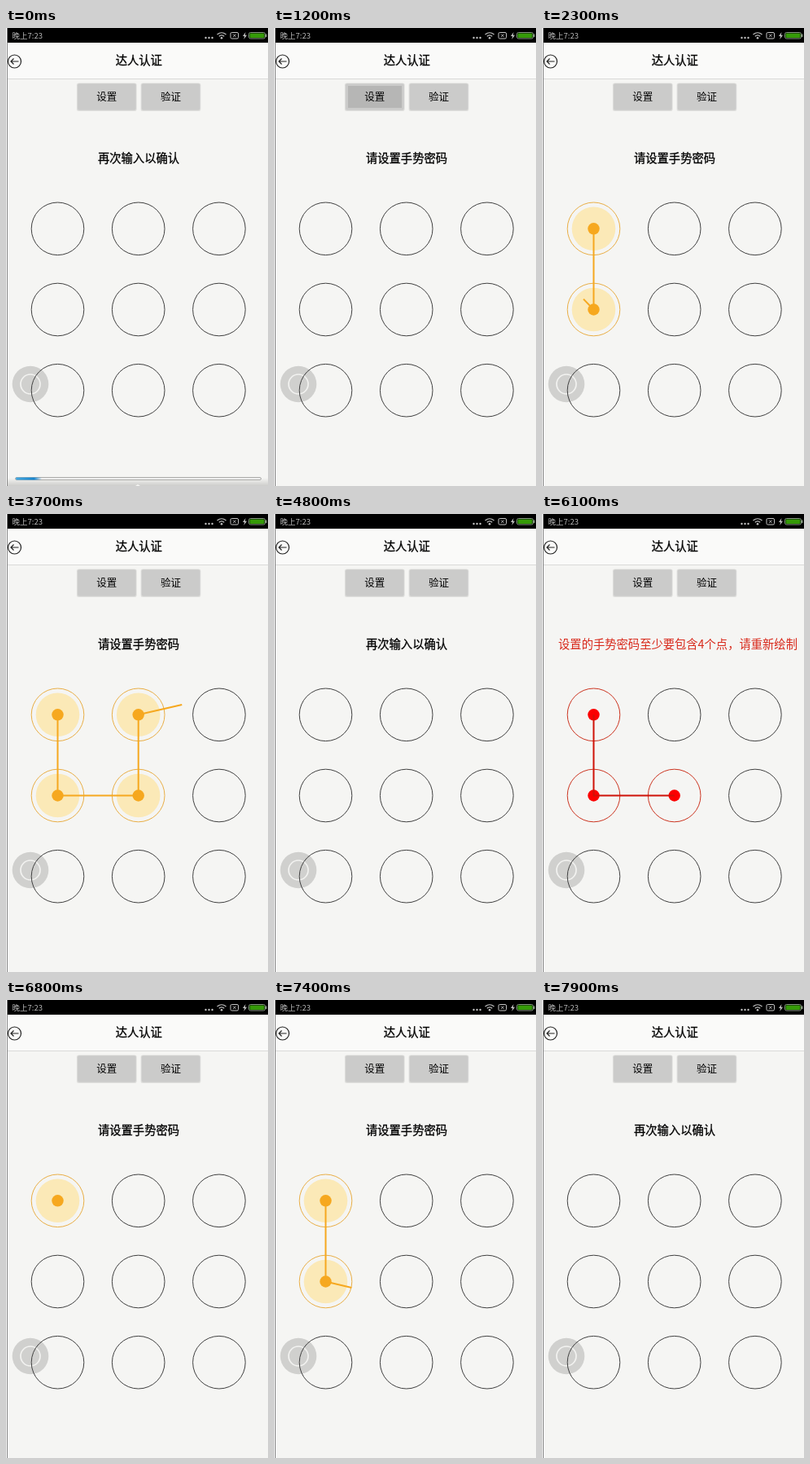
Animation, 322 px wide and 562 px high, one loop 8 s. Source, as an HTML page:

```html
<!DOCTYPE html>
<html lang="zh-CN">
<head>
<meta charset="utf-8">
<title>手势密码</title>
<style>
  html, body { margin: 0; width: 100%; height: 100%; overflow: hidden; background: #f5f5f3; }
  svg { display: block; width: 322px; height: 562px; }
  text { font-family: "Noto Sans CJK SC", "Noto Sans CJK", "Noto Sans", sans-serif; }
  .mid { text-anchor: middle; }
  .strong { font-size: 14.3px; stroke-width: .3px; }
</style>
</head>
<body>
<svg viewBox="0 0 322 562" xmlns="http://www.w3.org/2000/svg">
  <defs>
    <linearGradient id="shade" x1="0" y1="0" x2="0" y2="1">
      <stop offset="0" stop-color="#f5f5f3"/>
      <stop offset="1" stop-color="#cdcdcb"/>
    </linearGradient>
    <linearGradient id="blue">
      <stop offset="0" stop-color="#45a9e0"/>
      <stop offset=".7" stop-color="#1685cf"/>
      <stop offset="1" stop-color="#1685cf" stop-opacity="0"/>
    </linearGradient>
  </defs>

  <rect width="322" height="562" fill="#f5f5f3"/>
  <rect y="18" width="322" height="44" fill="#fafaf9"/>
  <rect y="62" width="322" height="1" fill="#d9d9d8"/>
  <rect width="1" height="562" fill="#fff"/>
  <rect x="1" width="1" height="562" fill="#858585"/>

  <!-- status bar -->
  <rect x="2" width="320" height="18" fill="#000"/>
  <text x="7.5" y="13" font-size="9.5" fill="#b8b8b8">晚上7:23</text>
  <g fill="#c4c4c4">
    <circle cx="245.5" cy="12" r="1.2"/><circle cx="249.5" cy="12" r="1.2"/><circle cx="253.5" cy="12" r="1.2"/>
    <circle cx="265" cy="12.3" r="1.3"/>
    <path d="M294.5 5l-3.5 5h2.2l-1 4 3.8-5.2h-2.3z"/>
  </g>
  <g fill="none" stroke="#c4c4c4">
    <path d="M259.5 8q5.5-4.5 11 0M261.8 10.3q3.2-2.7 6.4 0" stroke-width="1.2"/>
    <rect x="276" y="5.5" width="9.5" height="7.5" rx="1.5"/>
    <path d="M279 7.5l3.6 3.6m0-3.6l-3.6 3.6" stroke-width=".9"/>
    <rect x="298.5" y="5.5" width="20" height="7.5" rx="2" stroke="#84967f"/>
  </g>
  <rect x="299.5" y="6.5" width="18" height="5.5" rx="1" fill="#359a08"/>
  <rect x="319" y="7.5" width="1.5" height="3.5" fill="#84967f"/>

  <!-- header -->
  <g fill="none" stroke="#222" stroke-width="1.2">
    <circle cx="10.5" cy="41" r="8"/>
    <path d="M15.5 41H6m3.5-3.5L6 41l3.5 3.5"/>
  </g>
  <text class="mid strong" x="163.3" y="45.3" stroke="#000">达人认证</text>

  <g id="buttons"></g>
  <rect id="press" x="91" y="71" width="66" height="27" opacity="0"/>
  <g class="mid" font-size="12.5">
    <text x="123.7" y="89.3">设置</text>
    <text x="202.5" y="89.3">验证</text>
  </g>

  <!-- floating ball -->
  <circle cx="30" cy="437" r="22.3" fill="#d0d0ce"/>
  <circle cx="30" cy="437" r="12" fill="#d0d0ce" stroke="#f2f2f0" stroke-width="1.7"/>

  <text id="prompt" class="mid strong" y="165.4"></text>
  <g id="grid"></g>
  <path id="trail" fill="none" stroke-width="2" stroke-linejoin="round"/>

  <g id="bar">
    <rect x="2" y="552" width="320" height="10" fill="url(#shade)"/>
    <rect x="11.5" y="551.5" width="302" height="3" rx="1.5" fill="#eee" stroke="#a5a5a3" stroke-width=".9"/>
    <rect x="12" y="551.6" width="32" height="2.9" rx="1.4" fill="url(#blue)"/>
    <path d="M159 562l3-2 3 2z" fill="#f5f5f3"/>
  </g>
</svg>
<script>
const LOOP = 8000, STEP = 100, GAP = 99.2, REACH = 33;
const AMBER = "#f6a81f", RED = "#fb0000";
const SET = "请设置手势密码", AGAIN = "再次输入以确认";
const SHORT = "设置的手势密码至少要包含4个点，请重新绘制";
const $ = id => document.getElementById(id);

function add(parent, tag, attrs) {
  const el = document.createElementNS("http://www.w3.org/2000/svg", tag);
  parent.appendChild(el);
  return put(el, attrs);
}

function put(el, attrs) {
  for (const k in attrs) el.setAttribute(k, attrs[k]);
  return el;
}

for (const x of [87.5, 166.2]) {
  add($("buttons"), "rect", { x: x - .6, y: 67.4, width: 73.7, height: 34.6, rx: 2.5, fill: "#dededc" });
  add($("buttons"), "rect", { x: x + .4, y: 68.2, width: 71.8, height: 32.6, rx: 2, fill: "#cbcbca" });
}

const cells = Array.from({ length: 9 }, (_, i) => {
  const x = 63.5 + i % 3 * GAP, y = 246.3 + Math.floor(i / 3) * GAP;
  const at = { cx: x, cy: y };
  return {
    x, y,
    glow: add($("grid"), "circle", { ...at, r: 26.8, fill: "#fbe9b7" }),
    ring: add($("grid"), "circle", { ...at, r: 32.3, fill: "none" }),
    dot: add($("grid"), "circle", { ...at, r: 7.2 })
  };
});

// The finger rests at via[0] until start, then takes pace ms for each leg.
const gestures = [
  { from: 1900, start: 1900, to: 4800, pace: 480,
    via: [[56, 246], [50, 350], [163, 346], [163, 246], [234, 230], [262, 246]] },
  { from: 5400, start: 5400, lift: 6000, to: 6800, pace: 270,
    via: [[63, 250], [63, 346], [163, 348]] },
  { from: 6800, start: 6950, to: 7900, pace: 340,
    via: [[63, 246], [62, 352], [165, 355], [300, 350]] }
];

function fingerAt({ start, pace, via }, t) {
  const leg = Math.min(Math.max((t - start) / pace, 0), via.length - 1);
  const i = Math.min(Math.floor(leg), via.length - 2);
  return via[i].map((v, axis) => v + (via[i + 1][axis] - v) * (leg - i));
}

// Cells the finger has reached by time t, in order.
function reached(gesture, t) {
  const hit = new Set();
  for (let s = gesture.from; s <= t; s += STEP) {
    const [x, y] = fingerAt(gesture, s);
    const cell = cells.find(c => Math.hypot(c.x - x, c.y - y) < REACH);
    if (cell) hit.add(cell);
  }
  return [...hit];
}

function drawPrompt(t, error) {
  const first = t >= 1100 && t < 4800 || t >= 6800 && t < 7900;
  const shake = error && t < 6300 ? -4 * Math.cos(Math.PI * t / STEP) : 0;
  const fill = error ? "#d8281a" : "#000";
  $("prompt").textContent = error ? SHORT : first ? SET : AGAIN;
  put($("prompt"), { x: 163 + shake, fill, stroke: error ? "none" : fill });
}

function drawPattern(t, gesture, error) {
  const hit = gesture ? reached(gesture, t) : [];
  for (const c of cells) {
    const on = hit.includes(c);
    put(c.ring, { stroke: !on ? "#404040" : error ? "#cc3420" : "#e9ae45" });
    put(c.dot, { fill: error ? RED : AMBER, opacity: on ? 1 : 0 });
    put(c.glow, { opacity: on && !error ? 1 : 0 });
  }
  const points = hit.map(c => [c.x, c.y]);
  if (gesture && !error) points.push(fingerAt(gesture, t));
  put($("trail"), {
    d: points.length ? "M" + points.join("L") : "",
    stroke: error ? "#cf1208" : AMBER
  });
}

function draw(ms) {
  const t = Math.floor(ms % LOOP / STEP) * STEP;
  const gesture = gestures.find(g => t >= g.from && t < g.to);
  const error = !!gesture && t >= gesture.lift;
  drawPrompt(t, error);
  drawPattern(t, gesture, error);
  put($("press"), { opacity: t >= 1000 && t < 1400 ? .1 : 0 });
  put($("bar"), { opacity: Math.max(0, 1 - t / 600) });
}

let start;
function tick(now) {
  start ??= now;
  draw(now - start);
  requestAnimationFrame(tick);
}
draw(0);
requestAnimationFrame(tick);
</script>
</body>
</html>
```
